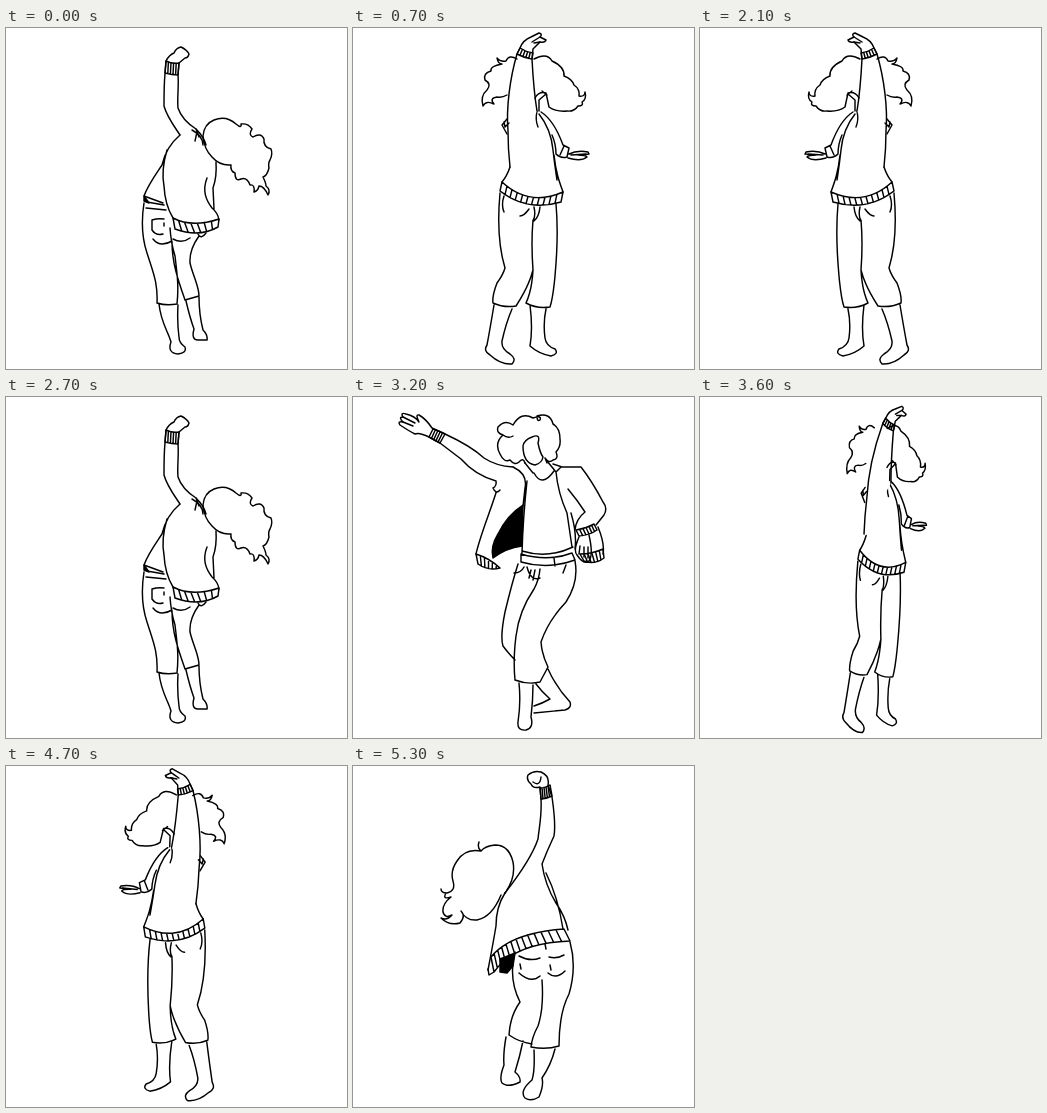
An HTML page that plays this animation: 341x341 px, repeating every 5400 ms.

```html
<!DOCTYPE html>
<html lang="en">
<head>
<meta charset="utf-8">
<title>Dancer</title>
<style>
  html, body { margin: 0; width: 100%; height: 100%; overflow: hidden; background: #fff; }
  #strip { display: flex; width: 9207px; height: 341px; animation: dance 2.7s steps(27) infinite; }
  #strip svg { flex: none; width: 341px; height: 341px; overflow: hidden; }
  path { fill: none; stroke: #000; stroke-width: 1.45; stroke-linecap: round; stroke-linejoin: round; vector-effect: non-scaling-stroke; }
  .arm { fill: #fff; }
  .ink { fill: #000; }
  @keyframes dance { to { transform: translateX(-100%); } }
</style>
</head>
<body>
<div id="strip"></div>
<script>
// Knitted band between two quadratic edges, each [x0,y0, cx,cy, x1,y1]
const ribs = (a, b, n) => {
  const at = (q, t) => [0, 1].map(i =>
    (q[i] * (1 - t) ** 2 + 2 * q[i + 2] * t * (1 - t) + q[i + 4] * t * t).toFixed(1));
  const edge = ([x, y, ...rest]) => `M${x} ${y}Q${rest}`;
  let d = edge(a) + edge(b);
  for (let i = 0; i <= n; i++) d += `M${at(a, i / n)}L${at(b, i / n)}`;
  return d;
};

const back = {
  legs: `M138 175C135 194 136 210 141 225C147 244 152 255 151 275Q160 278 171 276C173 258 171 245 169 228Q165 215 164 200
    M166 214C166 235 172 252 179 272L193 268C193 258 187 248 184 235Q183 222 193 208M200 205Q195 212 192 206
    M153 276C155 295 162 303 165 314Q161 325 172 326Q181 325 179 319Q173 315 173 309Q171 294 172 277
    M180 273Q184 290 188 301Q185 312 192 312L201 312Q202 307 197 302Q193 286 193 269
    M146 192L146 202Q150 208 157 206M158 191Q152 190 146 192M158 195L158 198M147 211Q154 220 166 213M167 211Q176 216 184 210`,
  torso: `M174 107Q160 119 156 137C148 149 142 157 138 168L157 175M161 122Q155 142 158 158Q159 177 167 190
    M190 101Q198 109 200 117M210 134Q211 149 207 160L208 181M201 150C196 163 200 172 206 180Q212 185 213 192
    M141 174L158 177M140 180L160 182M190 101L193 109`,
  hem: ribs([167, 190, 186, 200, 213, 191], [169, 201, 193, 210, 212, 199], 7),
  head: `M186 102Q197 108 197 117M191 104L189 113M197 108Q198 96 208 92Q220 87 230 96Q236 101 235 96Q242 95 246 101
    Q242 107 247 109Q255 104 258 111Q257 119 265 121Q267 126 264 132Q262 135 263 140Q261 148 257 149Q260 155 260 158Q265 162 262 167
    Q258 158 253 158Q252 163 248 164Q249 156 244 157Q241 149 235 151Q229 154 229 145Q224 143 225 137
    Q214 138 206 129Q198 121 197 108`,
  ink: `M138 168L143 175L138 173Z`,
  arm: `M174 107C168 98 161 89 158 78C158 68 158 56 159 46L160 33Q163 27 168 25Q170 20 175 19Q181 22 183 26Q182 30 179 30L173 35
    L172 47C173 58 171 70 172 80Q176 92 190 101`,
  cuff: ribs([160, 33, 166, 36, 173, 35], [159, 45, 166, 47, 172, 47], 5),
};

const leap = {
  legs: `M162 186C157 205 160 222 167 236Q157 250 156 269Q166 276 179 278M217 176Q224 201 216 228Q206 247 206 280Q193 284 178 281
    Q179 271 185 260Q191 242 189 214M192 178L193 183
    M153 271Q150 288 151 299Q146 312 149 317Q155 322 167 316Q168 311 162 306Q167 290 170 275
    M181 284Q182 305 179 314Q166 325 172 332Q178 336 186 331Q191 319 189 312Q198 299 202 283
    M166 190Q177 196 187 192M166 207Q178 218 187 210M196 191Q204 193 211 189M195 207Q203 214 212 205M167 198L168 203M197 199L198 204`,
  torso: `M152 127Q143 141 143 160Q140 178 135 204M189 98Q192 119 203 137Q212 150 215 164M193 107Q205 131 210 163`,
  hem: ribs([211, 163, 157, 167, 138, 191], [217, 175, 161, 177, 141, 206], 13) + `M135 203L136 209L141 206`,
  head: `M152 127Q163 112 160 96Q156 79 142 79Q132 80 128 85Q124 82 126 76M128 85Q112 82 104 95Q97 105 100 115
    Q103 125 94 127Q88 127 88 123M93 127Q89 134 98 131Q89 138 90 146Q92 153 99 149Q94 155 88 152
    Q96 160 107 157Q113 150 108 145Q113 155 124 154Q139 151 148 129`,
  ink: `M147 193L162 187L160 200L154 207L147 206Z`,
  arm: `M152 127C166 109 179 91 185 73C186 62 189 50 188 33L187 21Q180 23 178 18Q173 14 175 9Q181 4 188 6Q197 10 195 19
    L199 31C201 45 203 58 201 70Q194 85 189 98`,
  cuff: ribs([187, 22, 192, 22, 197, 19], [188, 33, 193, 33, 199, 30], 5) + `M180 16Q187 21 188 11`,
};

const front = {
  legs: `M147 165C145 187 145 217 152 240Q150 247 144 255Q139 268 140 275Q151 280 163 278Q176 258 180 242Q178 215 180 192
    M203 176C205 198 204 226 202 248Q200 270 197 279Q184 281 173 275Q179 262 180 242
    M141 277Q137 301 134 317Q130 323 137 327Q148 337 159 336Q164 331 157 326Q148 321 149 313Q153 295 159 281
    M177 277Q180 301 177 318Q186 326 198 328Q206 326 202 321Q193 318 192 310Q190 295 193 281
    M151 168Q148 177 151 184M181 179Q183 188 180 193M187 179Q186 189 181 193M176 181Q171 188 167 188`,
  torso: `M157 139Q154 148 149 154M184 83Q182 92 185 99M186 86Q198 101 200 122C202 140 203 145 204 152M201 127C203 145 206 153 210 164
    M188 84C199 91 206 106 210 117L216 120L214 129Q208 131 203 126Q203 116 199 107M211 118L207 127
    M216 126Q224 122 235 124L236 126L225 127Q233 127 234 129Q228 134 215 130M218 127L233 126`,
  hem: ribs([149, 154, 176, 179, 210, 164], [147, 163, 174, 184, 208, 174], 11),
  head: `M164 31Q156 26 153 33Q147 34 144 30Q145 36 149 36Q137 38 138 43Q130 45 132 52Q139 56 134 62Q127 68 130 78
    Q133 72 141 76Q136 70 144 69Q149 70 154 67M154 91L149 97L154 106M156 95L152 99L151 94
    M181 31Q194 24 199 33Q212 39 211 48Q219 51 221 57Q227 61 226 68Q232 69 232 64Q234 71 229 74Q231 78 225 78Q221 84 214 83
    Q203 84 196 79L193 65Q186 63 182 70M193 66L186 72L186 83M189 63L194 67`,
  arm: `M157 139Q155 121 155 103C153 80 157 50 164 26L167 20Q170 12 178 9L186 5Q190 6 187 9L193 12Q192 15 187 14L180 21
    L179 31C180 50 181 65 184 83`,
  cuff: ribs([167, 20, 173, 24, 180, 25], [164, 26, 171, 30, 179, 31], 5) + `M187 9L179 14M187 14L181 15`,
};

const pose = {
  legs: `M165 167Q159 186 152 215Q147 240 150 249Q156 257 162 263M222 164Q226 185 213 205Q195 224 188 245Q189 258 195 270L187 285
    Q175 288 162 283Q160 262 163 239Q166 214 181 192Q186 183 187 172
    M166 286Q168 306 165 325Q164 334 173 333Q181 331 178 320Q180 303 180 288
    M195 272Q203 290 217 305Q219 311 212 313L181 316M181 309Q190 306 197 302Q189 295 183 287
    M174 170Q178 185 187 181M178 173L176 181M182 173L180 183M171 170Q168 176 161 176M213 168L210 176`,
  torso: `M160 70Q175 77 172 91L170 109M146 86C139 111 128 135 123 157M174 84Q170 121 169 156M181 76Q189 91 201 74
    M169 154Q195 162 220 150M203 75Q205 96 214 116L219 150M200 67L209 70L228 70Q239 84 250 105Q255 111 251 118L243 128
    M194 64L203 75L208 70M172 66L180 76M215 92Q225 104 232 115Q223 122 222 133M218 116Q224 136 222 152
    M168 157Q195 165 219 156M168 165Q195 173 222 163M168 157L168 165M219 156L222 163M201 161L202 169
    M226 140Q220 154 224 158Q230 167 235 165Q241 160 236 138M226 157L227 149M231 160L231 150M235 161L235 150M245 130Q252 147 250 157`,
  hem: ribs([123, 157, 136, 161, 147, 171], [125, 167, 135, 174, 147, 171], 6)
    + ribs([223, 133, 234, 131, 241, 127], [226, 139, 237, 138, 244, 133], 6)
    + ribs([227, 157, 239, 157, 250, 152], [231, 164, 242, 168, 251, 161], 6),
  head: `M150 38Q143 36 145 30Q152 22 160 28Q168 14 180 21Q189 18 187 23Q184 25 184 19Q197 15 200 27Q207 31 207 42
    Q208 50 203 55Q206 62 200 63Q196 67 192 61M150 38Q141 46 147 57Q151 66 157 63Q162 69 166 65Q170 60 172 66
    M170 49Q171 43 179 40Q188 36 185 46Q187 56 190 60Q189 66 182 68Q170 66 170 49M150 38Q155 42 160 39M192 61L194 66`,
  ink: `M170 108Q154 118 145 137Q137 150 140 161Q153 151 169 149Z`,
  arm: `M147 93Q143 98 140 91Q144 89 143 84Q122 78 108 62L87 46L76 40Q66 35 62 37Q56 34 47 28Q44 24 50 25Q45 20 50 20Q47 15 53 17
    Q62 19 66 25Q62 17 66 18Q73 22 79 31L92 37Q118 49 131 61Q143 69 160 70`,
  cuff: ribs([80, 32, 86, 34, 92, 37], [76, 40, 82, 44, 87, 46], 5) + `M50 25L60 29M50 20L62 26`,
};

const path = (d, kind = '') => d ? `<path class="${kind}" d="${d}"/>` : '';
const group = (t, inner) => `<g transform="${t}">${inner}</g>`;
const armOf = p => path(p.arm, 'arm') + path(p.cuff);
const draw = (p, armMove = '', arm = armOf(p)) =>
  path(p.legs) + path(p.torso) + path(p.hem) + path(p.ink, 'ink') + group(armMove, arm) + path(p.head);
const flip = s => group('translate(341) scale(-1 1)', s);
// Narrow the figure about its axis as it turns
const turn = (k, s, tilt = 0) => group(`translate(174 0) scale(${k} 1) translate(-174 0) rotate(${tilt} 174 330)`, s);
const reach = (x, y, k, angle) => group(`translate(${x} ${y}) rotate(${angle}) scale(${k}) translate(-150 -77)`, armOf(pose));

const half = [
  draw(back),
  turn(.9, draw(back, 'rotate(-18 182 104)'), -1),
  turn(.72, draw(back, 'rotate(-42 182 104)'), -2),
  turn(.78, draw(pose, 'rotate(-14 152 76)')),
  draw(pose, 'translate(-1 1) rotate(-4 152 76)'),
  draw(pose),
  group('translate(0 -2)', turn(.97, draw(front), -2)),
  draw(front),
  turn(.88, draw(front, 'rotate(3 166 115)'), 1),
  turn(.76, draw(front, 'rotate(7 166 115)'), 2),
  turn(.84, flip(draw(leap, '', reach(164, 118, 1, -4)))),
  flip(draw(leap, '', reach(152, 115, 1, -14) + flip(reach(152, 112, .84, -8)))),
  flip(draw(leap)),
  draw(back),
];

const frames = [...half, ...half.slice(0, 13).map(flip)];
document.getElementById('strip').innerHTML =
  frames.map(s => `<svg viewBox="0 0 341 341">${s}</svg>`).join('');
</script>
</body>
</html>
```
